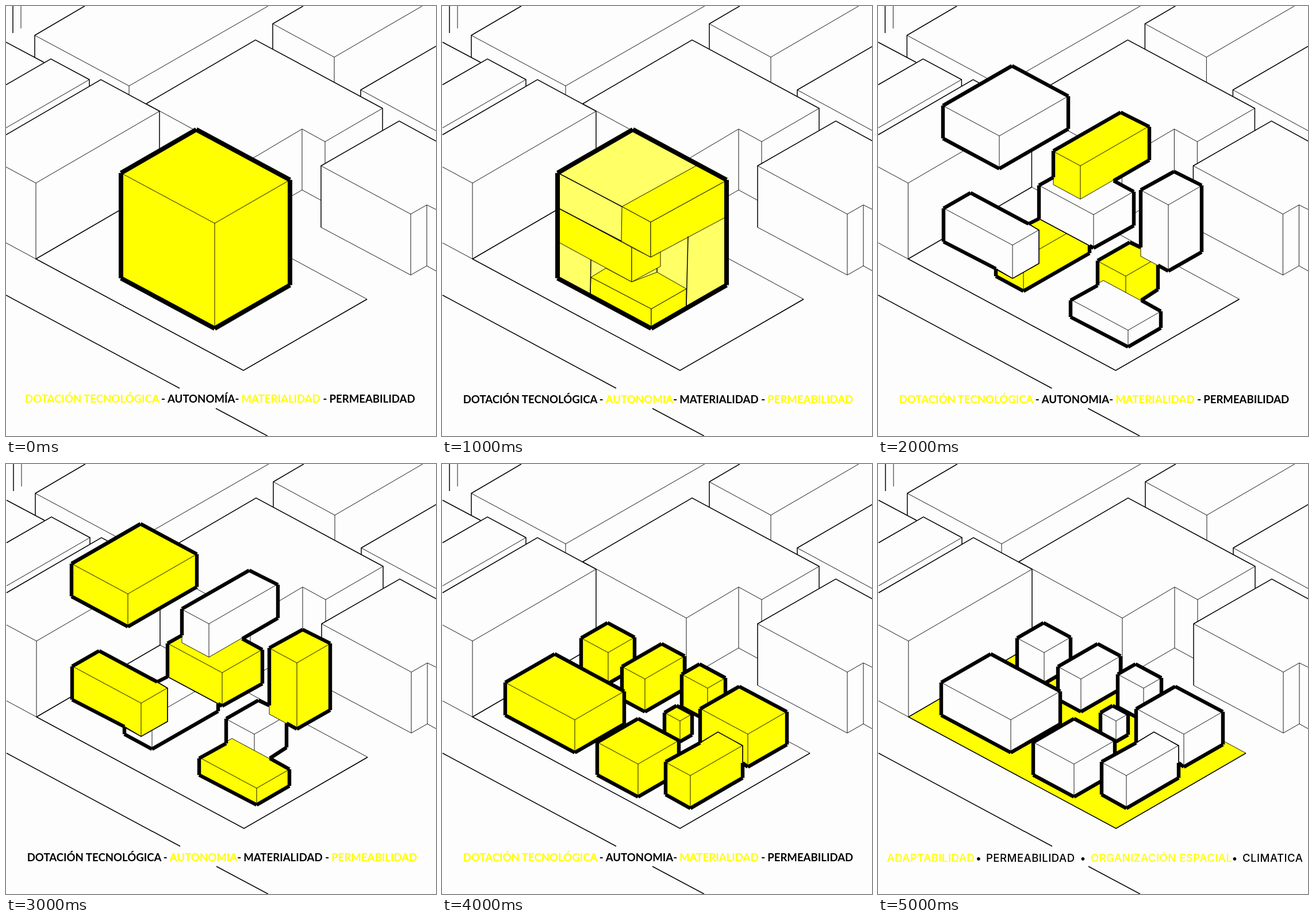
Write an HTML page that moves like this. It is 748x748 px and loops after 6 s.

```html
<!DOCTYPE html>
<html lang="es">
<head>
<meta charset="utf-8">
<title>Volúmenes</title>
<style>
  html, body { margin: 0; width: 100%; height: 100%; overflow: hidden; background: #fdfdfd; }
  svg { display: block; width: 100vw; height: 100vh; }
  .scene { visibility: hidden; animation: show 6s step-end infinite; }
  @keyframes show {
    0% { visibility: visible; }
    16.666%, 100% { visibility: hidden; }
  }
  .thin, .medium, .bold { fill: none; stroke: #000; }
  .thin { stroke-width: .9; }
  .medium { stroke-width: 1.5; }
  .bold { stroke-width: 6.4; }
  .heavy { stroke-width: 8; }
  .caption { font: 700 18.6px Lato, sans-serif; }
  .caption.wide { font: 500 18.5px Inter, sans-serif; letter-spacing: .5px; }
</style>
</head>
<body>
<svg id="stage" viewBox="0 0 748 748"></svg>
<script>
const WHITE = '#fdfdfd', YELLOW = '#ff0', PALE = '#ff6';
const LEFT_SLOPE = .537, RIGHT_SLOPE = .577;

const path = (d, cls, fill) =>
  `<path d="${d}" class="${cls}"${fill ? ` style="fill:${fill}"` : ''}/>`;
const group = (content, dx) => `<g transform="translate(${dx})">${content}</g>`;

// Separate segments leave the small notches at the corners.
function outline(points, cls = 'bold') {
  return path(points.map((p, i) => `M${p}L${points[(i + 1) % points.length]}`).join(''), cls);
}

// x, y: front top corner; a, b: horizontal reach to the left and right; h: height.
function corners([x, y, a, b, h]) {
  const left = [x - a, y - a * LEFT_SLOPE];
  const right = [x + b, y - b * RIGHT_SLOPE];
  const back = [left[0] + b, left[1] - b * RIGHT_SLOPE];
  const drop = ([px, py]) => [px, py + h];
  return { left, right, front: [x, y],
           rim: [back, right, drop(right), drop([x, y]), drop(left), left] };
}

function box(dims, fill, edge) {
  const { left, right, front, rim } = corners(dims);
  return path(`M${rim.join('L')}Z`, 'thin', fill) +
    path(`M${left}L${front}L${right}M${front}v${dims[4]}`, 'thin') +
    (edge ? outline(rim, edge) : '');
}

const streetThick = `M12 0V47M50 90V51L137 0M0 63L66 98M0 137L78 92L145 128V140
  M0 224L165 128L267 183V316M0 503L302 665M365 700L455 748
  M244 170L434 59L655 178V216M517 0L464 31V75M748 70L617 146V158
  M548 385V278L684 200L748 235`;
const streetThin = `M26 0V39M50 51L214 139L456 0M214 139V155M145 128L0 212
  M0 280L52 308L267 183M52 308V440L0 412M244 170L424 268L515 214L555 236L655 178
  M555 236V275M515 214V320L548 338M424 268V373L515 320
  M464 31L571 89L724 0M571 89V132M617 146L748 217
  M548 278L704 362V468L548 385M704 362L732 346L748 354M732 346V452L704 468M732 452L748 461`;

function street(enlarged, fill = 'none') {
  const [back, right] = enlarged ? ['279 308', '639 503'] : ['267 315', '628 510'];
  return path(`M52 440L${back}L${right}L413 634Z`, 'thin', fill) +
    path(`M${right}L413 634L52 440L${back}`, 'medium') +
    path(streetThin, 'thin') + path(streetThick, 'medium');
}

const cubeDims = [363, 378, 163, 131, 183];
const wholeCube = () => box(cubeDims, YELLOW, 'bold heavy');

function carvedCube() {
  const { rim } = corners(cubeDims);
  const solid = [
    'M441 278L493 304L362 376L312 349Z',
    'M312 349L362 376V437L311 409Z',
    'M362 376L493 304V367L362 437Z',
    'M202 352L329 420V480L202 411Z',
    'M329 420L362 437L379 428V453L329 480Z',
    'M258 472L284 456L329 480L373 463L424 492L363 527Z',
    'M258 472L363 527V560L257 501Z',
    'M363 527L424 492V523L363 560Z'
  ];
  return path(`M${rim.join('L')}Z`, 'thin', PALE) +
    solid.map(d => path(d, 'thin', YELLOW)).join('') +
    path('M202 291L312 349M258 441L257 501M427 401L424 523M373 456V463M202 352L311 409', 'medium') +
    outline(rim, 'bold heavy');
}

const roofDims = [211, 226, 98, 120, 57];
const towerRim = [[280,312],[305,298],[305,252],[422,185],[472,210],[472,268],[410,304],
  [445,323],[445,382],[375,421],[368,417],[368,430],[253,496],[205,470],[205,457],
  [114,410],[114,352],[161,325],[262,379],[280,370]];
const clusterRim = [[457,420],[457,320],[515,288],[563,312],[563,428],[505,461],[487,451],
  [487,493],[458,512],[492,531],[492,560],[435,593],[335,541],[335,512],[382,486],
  [382,443],[438,411]];

function exploded(first, second) {
  return box(roofDims, first, 'bold') +
    box([253, 439, 48, 115, 57], second) +
    box([375, 363, 95, 70, 58], first) +
    box([234, 416, 120, 46, 58], first) +
    box([352, 278, 47, 120, 58], second) +
    path('M262 379L280 390V448L234 474L205 457M280 370L368 417', 'medium') +
    outline(towerRim) +
    box([431, 470, 49, 56, 57], second) +
    box([505, 346, 48, 58, 115], first) +
    box([435, 564, 100, 57, 29], first) +
    outline(clusterRim);
}

function village(fill) {
  const detached = [
    [289, 328, 47, 46, 54], [353, 374, 40, 69, 57], [462, 390, 45, 31, 57],
    [414, 447, 27, 21, 36], [231, 445, 121, 86, 57], [341, 522, 71, 71, 57]
  ];
  const pairRim = [[449,485],[389,518],[389,575],[432,599],[523,546],[523,520],[532,527],
    [600,488],[600,431],[517,387],[449,426]];
  return detached.map(dims => box(dims, fill, 'bold')).join('') +
    box([532, 470, 83, 68, 57], fill) +
    box([432, 542, 43, 91, 57], fill) +
    path('M449 485L480 466L523 490V520', 'medium') +
    outline(pairRim);
}

function caption(words, starts, marks, y, yellowFirst, bullet) {
  const text = (s, x, fill) => `<text x="${x}" y="${y}" fill="${fill}">${s}</text>`;
  return `<g class="caption${bullet ? ' wide' : ''}">` +
    words.map((w, i) => text(w, starts[i], (i % 2 === 0) === yellowFirst ? YELLOW : '#000')).join('') +
    marks.map(x => text(bullet ? '•' : '-', x, '#000')).join('') + '</g>';
}

const title = (yellowFirst, dx = 3.7, y = 691, third = 'AUTONOMIA') => caption(
  ['DOTACIÓN TECNOLÓGICA', third, 'MATERIALIDAD', 'PERMEABILIDAD'],
  [33, 281, 409.5, 562.5].map(x => x + dx), [270, 398.5, 551.5].map(x => x + dx), y, yellowFirst);
const closing = caption(
  ['ADAPTABILIDAD', 'PERMEABILIDAD', 'ORGANIZACIÓN ESPACIAL', 'CLIMATICA'],
  [15.5, 188, 370, 634], [170, 351.5, 615.5], 692, true, true);

const scenes = [
  street() + wholeCube() + title(true, 0, 690, 'AUTONOMÍA'),
  group(street() + carvedCube(), 1) + title(false),
  group(street(), .4) + exploded(WHITE, YELLOW) + title(true),
  group(street() + exploded(YELLOW, WHITE), 1) + title(false),
  group(street(true), 1) + village(YELLOW) + title(true),
  group(street(true, YELLOW), 1) + village(WHITE) + closing
];

document.getElementById('stage').innerHTML = scenes.map((content, i) =>
  `<g class="scene" style="animation-delay:${i ? i - scenes.length : 0}s">
    <rect width="748" height="748" fill="${WHITE}"/>${content}</g>`).join('');
</script>
</body>
</html>
```
